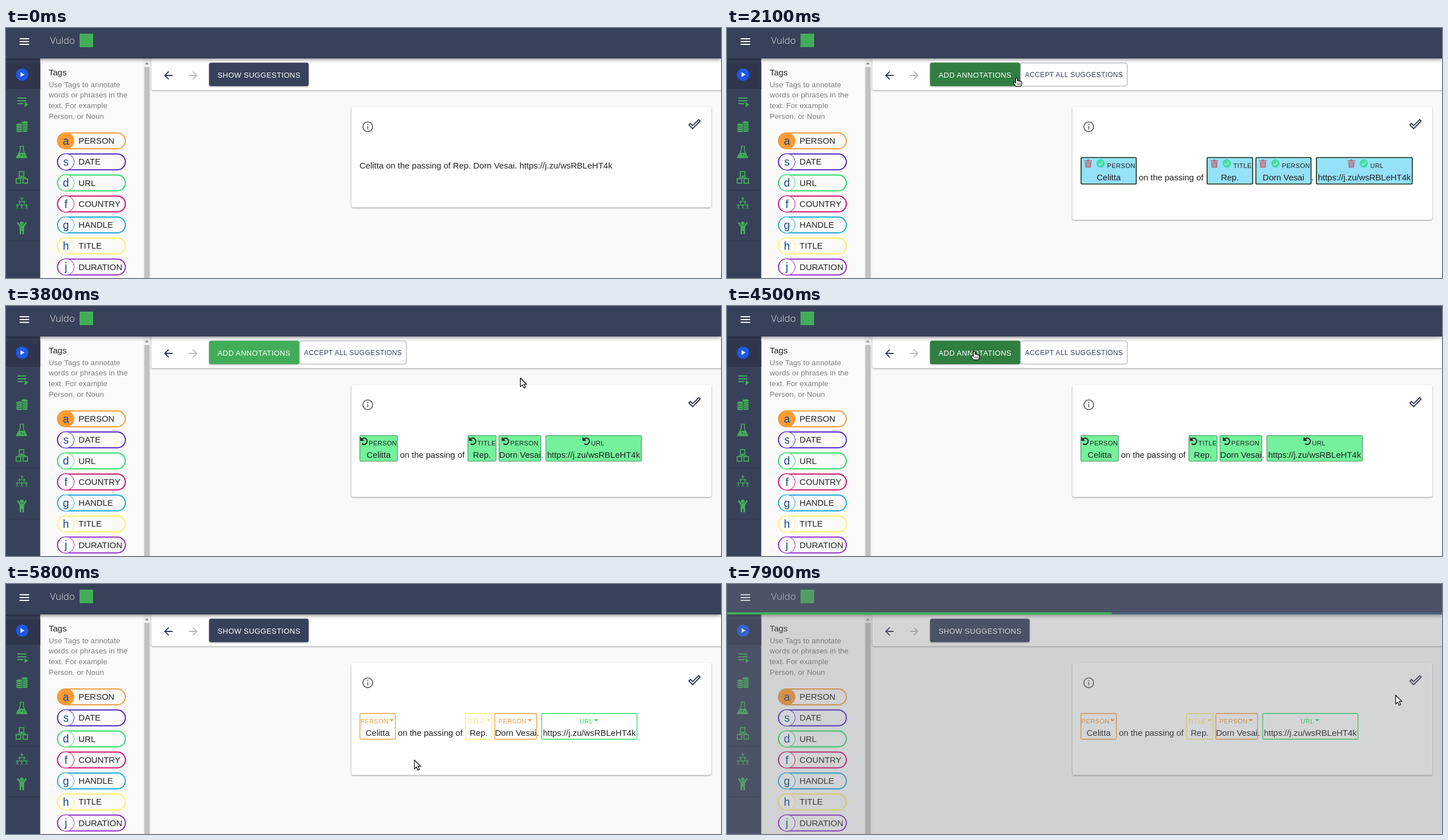
An HTML page that plays this animation: 1264x443 px, repeating every 8 s.

```html
<!DOCTYPE html>
<html lang="en">
<head>
<meta charset="utf-8">
<title>Text annotation</title>
<style>
html, body { margin: 0; width: 100%; height: 100%; overflow: hidden; background: #f9f9f9; }
svg { display: block; width: 1264px; height: 443px; font-family: "Liberation Sans", Arial, sans-serif; font-size: 15px; }
.low { filter: drop-shadow(0 1px 1px rgba(0,0,0,.42)); }
.raised { filter: drop-shadow(0 1.5px 1.5px rgba(0,0,0,.38)); }
.bar { filter: drop-shadow(0 2px 3px rgba(0,0,0,.45)); }
.btn { font-size: 13.125px; letter-spacing: .375px; }
.small { font-size: 12.1875px; letter-spacing: .348px; }
.hint { font-size: 13.125px; letter-spacing: .14px; fill: #7b7b7b; }
.label { font-size: 11.25px; letter-spacing: .375px; }
</style>
</head>
<body>
<svg id="stage" viewBox="0 0 1264 443"></svg>
<script>
const NAVY = '#38415a', GREEN = '#42ad59', INK = '#212121', ORANGE = '#f19c38';
const LOOP = 8000;
const FIRST = 'Celitta', FULL = 'Dorn Vesai', LINK = 'https://j.zu/wsRBLeHT4k';

const rect = (x, y, w, h, fill, r = 0, more = '') =>
  `<rect x="${x}" y="${y}" width="${w}" height="${h}" rx="${r}" fill="${fill}" ${more}/>`;
const circle = (x, y, r, fill, more = '') => `<circle cx="${x}" cy="${y}" r="${r}" fill="${fill}" ${more}/>`;
const path = (d, fill, more = '') => `<path d="${d}" fill="${fill}" ${more}/>`;
const line = (d, color, w = 2, more = '') => path(d, 'none', `stroke="${color}" stroke-width="${w}" ${more}`);
const text = (x, y, s, fill = INK, more = '') => `<text x="${x}" y="${y}" fill="${fill}" ${more}>${s}</text>`;
const mid = (x, y, s, fill = INK, more = '') => text(x, y, s, fill, `text-anchor="middle" ${more}`);
const group = (id, body, more = '') => `<g id="${id}" ${more}>${body}</g>`;
const at = (x, y, body, k = 1) => `<g transform="translate(${x} ${y}) scale(${k})">${body}</g>`;

// Top bar
function header() {
  return `<g class="bar">${rect(0, 0, 1264, 54, NAVY)}</g>` +
    line('M24 19H41M24 24H41M24 29H41', '#fff', 1.9) +
    text(78, 28, 'Vuldo', '#e8eaee', 'font-family="Open Sans, sans-serif" font-size="17" font-weight="300"') +
    rect(130, 10, 24, 24, GREEN);
}

// Left icon rail
function coins(x, y, n) {
  let s = '';
  for (let i = n - 1; i >= 0; i--) {
    s += `<ellipse cx="${x}" cy="${y + i * 3.6}" rx="6" ry="2.8" fill="${GREEN}" stroke="${NAVY}" stroke-width=".9"/>`;
  }
  return s;
}
function mini(x, y) {
  return circle(x, y, 1.5, GREEN) + line(`M${x - 3} ${y}L${x} ${y + 3}L${x + 3} ${y}M${x} ${y + 2}V${y + 4}L${x - 2} ${y + 7}M${x} ${y + 4}L${x + 2} ${y + 7}`, GREEN, 1);
}
function rail() {
  const box = (x, y) => rect(x, y, 8, 8, 'none', 0, `stroke="${GREEN}" stroke-width="1.8"`);
  return rect(0, 54, 60.5, 389, NAVY) + rect(0, 62, 60.5, 46, '#2f364b') +
    line('M0 287.5H60M0 377.5H60', '#2e364b', 1) +
    circle(28.5, 82.5, 10.8, '#1d58e8') + path('M25.7 78.2V86.8L32.6 82.5Z', '#fff') +
    line('M20 124H36M20 129H36M20 134H31', GREEN, 2.1) + path('M33 131.5V140L39.5 135.7Z', GREEN) +
    coins(33, 167.5, 5) + coins(23.5, 171.5, 4) +
    line('M24 209.5H32M25.3 210V217L18.5 229.5H36.5L30.7 217V210', GREEN, 1.6) +
    path('M22.5 221H33L37.5 230.5H18Z', GREEN) + circle(27, 225, 1.2, NAVY) + circle(31, 226.5, .9, NAVY) +
    box(23.5, 254.5) + box(18, 267) + box(30, 267) + line('M27.5 263V267M22 267V264.8H34V267', GREEN, 1.4) +
    mini(28, 301.5) + mini(24, 307.5) + mini(32, 307.5) + mini(20, 313.5) + mini(28, 313.5) + mini(36, 313.5) +
    circle(28, 346.3, 3.2, GREEN) +
    line('M21 345.5L25 351.5H31L35 345.5', GREEN, 3, 'stroke-linecap="round" stroke-linejoin="round"') +
    path('M24 350.5H32V365.5H29V359.5H27V365.5H24Z', GREEN);
}

// Tag list
function tagPanel() {
  const tags = [['a', 'PERSON', ORANGE], ['s', 'DATE', '#4c22c4'], ['d', 'URL', '#27dc5f'],
    ['f', 'COUNTRY', '#d00d6b'], ['g', 'HANDLE', '#19a9dc'], ['h', 'TITLE', '#fdef62'], ['j', 'DURATION', '#9426d0']];
  const hint = ['Use Tags to annotate', 'words or phrases in the', 'text. For example', 'Person, or Noun'];
  let s = rect(60.5, 54, 183, 389, '#fafafa') + rect(243, 54, 13.5, 389, '#f1f1f1') +
    rect(244.5, 69, 9.5, 380, '#c1c1c1') + path('M245.5 64.5H252.5L249 60.5Z', '#8f8f8f') +
    text(75.5, 84, 'Tags');
  hint.forEach((h, i) => { s += text(75.5, 104.6 + i * 18.7, h, '', 'class="hint"'); });
  tags.forEach(([key, name, color], i) => {
    const y = 200 + i * 37.25;
    s += rect(91, y - 14, 120, 28, 'none', 14, `stroke="${color}" stroke-width="2"`) +
      circle(106, y, 14.5, i ? '#fff' : '#ff9b33', `stroke="${color}" stroke-width="1"`) +
      mid(106, y + 6.8, key, '#184a8c', 'font-size="19.5"') +
      text(128.3, y + 5, name);
  });
  return s;
}

// Toolbar with its two button sets
function toolbar() {
  const arrow = 'M20 11H7.83l5.59-5.59L12 4l-8 8 8 8 1.41-1.41L7.83 13H20v-2z';
  const button = (w, fill, label, shade) => `<g class="raised">${rect(359, 61.5, w, 41.5, fill, 3.5)}</g>` +
    rect(359, 61.5, w, 41.5, '#000', 3.5, `id="${shade}" opacity="0"`) +
    text(374, 87.5, label, '#fff', 'class="btn"');
  return `<g class="low">${path('M257 54H1264V110.3H260.5Q257 110.3 257 107Z', '#fff')}</g>` +
    at(275.7, 72.7, path(arrow, '#2d364d'), .9375) +
    `<g transform="translate(342.3 72.7) scale(-.9375 .9375)">${path(arrow, '#b8b8b8')}</g>` +
    group('show', button(176, NAVY, 'SHOW SUGGESTIONS', 'showShade')) +
    group('review', button(159.5, GREEN, 'ADD ANNOTATIONS', 'addShade') +
      rect(518.9, 62, 188.7, 41, '#fff', 3.5, 'stroke="#9ba0ac"') +
      rect(518.9, 62, 188.7, 41, '#d9dadd', 3.5, `id="acceptShade" stroke="${NAVY}" opacity="0"`) +
      text(526.7, 87.2, 'ACCEPT ALL SUGGESTIONS', NAVY, 'class="small"'));
}

// Marked sentence: spans are [left, right, label x, label, word, colour]
function marked(spans, base, bottom, frame, extras) {
  const stop = spans[2][1];
  let s = text(spans[0][1] + 4.4, base, 'on the passing of') + text(stop + .3, base, '.');
  for (const [l, r, lx, label, word, color] of spans) {
    s += rect(l, 229.5, r - l, bottom - 229.5, frame.fill, 1.5, `stroke="${frame.stroke || color}" stroke-width="${frame.width}"`) +
      extras(lx, label) +
      text(lx, base - 22, label, frame.ink || color, 'class="label"') +
      mid((l + r) / 2, base, word);
  }
  return s;
}
function suggested() {
  const icons = x => at(x - 33.5, 240.5,
    line('M-6.5 -5H6.5M-2 -6.5H2', '#b4737f', 1.8) +
    path('M-5.5 -3H5.5L5 7H-5Z', '#b4737f') + line('M-2.2 -1V5M0 -1V5M2.2 -1V5', '#94e1f8', .8)) +
    circle(x - 11.5, 240, 7.4, '#42dda3') +
    line(`M${x - 15} 240L${x - 12.3} 242.7L${x - 7.7} 237.6`, '#b9f2f3', 1.5);
  return marked([
    [626, 723.5, 672, 'PERSON', FIRST], [848.7, 929.3, 895, 'TITLE', 'Rep.'],
    [935, 1032.5, 981, 'PERSON', FULL], [1042, 1211.5, 1137.3, 'URL', LINK]
  ], 270, 276.5, { fill: '#94e1f8', stroke: '#0f2a14', width: 1.6, ink: INK }, icons);
}
function accepted() {
  const undo = x => line(`M${x - 13} 236.5A5.6 5.6 0 1 1 ${x - 12} 244`, INK, 2) +
    path(`M${x - 15} 232V239H${x - 8}Z`, INK);
  return marked([
    [625.5, 692, 641.3, 'PERSON', FIRST], [816.5, 866.3, 833.3, 'TITLE', 'Rep.'],
    [871.5, 945.5, 891.5, 'PERSON', FULL], [954.3, 1123.3, 1034.2, 'URL', LINK]
  ], 269, 275, { fill: '#73f19b', stroke: '#3f8f57', width: 1, ink: INK }, undo);
}
function annotated() {
  const lime = '#27dc5f', sun = '#fbec6a';
  const spans = [
    [625.7, 688.4, 626.6, 'PERSON', FIRST, ORANGE], [812.5, 858.7, 814.3, 'TITLE', 'Rep.', sun],
    [864.3, 938, 870.6, 'PERSON', FULL, ORANGE], [947, 1115.5, 1014, 'URL', LINK, lime]];
  const caret = { 626.6: [681.6, ORANGE], 814.3: [852.8, sun], 870.6: [926, ORANGE], 1014: [1043.3, lime] };
  return marked(spans, 269, 275, { fill: 'none', width: 1.3 }, x => {
    const [c, color] = caret[x];
    return path(`M${c - 3.9} 239.6H${c + 3.9}L${c} 243.8Z`, color);
  });
}
function card() {
  const tick = 'M19.77 5.03l1.4 1.4L8.43 19.17l-5.6-5.6 1.4-1.4 4.2 4.2L19.77 5.03m0-2.83L8.43 13.54l-4.2-4.2L0 13.57 8.43 22 24 6.43 19.77 2.2z';
  return `<g class="low">${rect(610.5, 140, 636.5, 178, '#fff', 3.7, 'id="sheet"')}</g>` +
    circle(639.5, 175, 8.6, 'none', 'stroke="#666" stroke-width="1.8"') +
    line('M639.5 174V179.5M639.5 170.3V172.2', '#666', 1.9) +
    circle(1217.3, 170.5, 22.3, '#ebebeb', 'id="halo" opacity="0"') +
    at(1206, 159, path(tick, '#2d364d'), .9375) +
    group('plain', text(625, 248.6, `${FIRST} on the passing of Rep. ${FULL}. ${LINK}`)) +
    group('suggested', suggested()) + group('accepted', accepted()) + group('annotated', annotated()) +
    group('tip', rect(1190.5, 206, 53, 23, '#6d6d6d', 3.7) + mid(1217, 222, 'Submit', '#fff', 'font-size="12.2"'), 'opacity="0"');
}

function cursors() {
  const edge = 'stroke="#000" stroke-width="1.2" stroke-linejoin="round"';
  return group('arrow', path('M0 0V15.6L3.7 12.2L6.3 18L8.9 16.8L6.4 11.2H11.2Z', '#fff', edge)) +
    group('hand', path('M-1.6 1.2Q0 -.8 1.6 1.2V5.6Q3.3 4.6 4.3 6.1Q6 5.2 6.8 6.8Q9 6.2 9 8.6V11.5L7.6 15.4H-1.4L-5.2 10Q-5.6 7.4 -3.2 8.2L-1.6 9.6Z', '#fff', edge) +
      line('M1.2 9.5V12.8M3.6 9.5V12.8M6 9.5V12.8', '#000', .9));
}

const stage = document.getElementById('stage');
stage.innerHTML = rect(0, 0, 1264, 443, '#f9f9f9') + tagPanel() + toolbar() + card() + rail() + header() +
  group('veil', rect(0, 0, 1264, 443, 'rgb(116,119,126)', 0, 'fill-opacity=".31"')) +
  group('progress', rect(0, 50, 1264, 4, '#4a6482') + rect(0, 50, 0, 4, '#3fae58', 0, 'id="fill"')) + cursors();

const el = {};
stage.querySelectorAll('[id]').forEach(n => { el[n.id] = n; });

const clamp = v => Math.max(0, Math.min(1, v));
const smooth = v => v * v * (3 - 2 * v);
const pulse = (t, a, b, d = 180) => clamp((t - a) / d) * (1 - clamp((t - b) / d));
const set = (n, k, v) => el[n].setAttribute(k, v);
const show = (n, on) => set(n, 'display', on ? 'inline' : 'none');

// Pointer stops: time, x, y
const stops = [[300, 470, 158], [850, 452, 86], [1600, 452, 86], [2060, 512, 88], [2100, 512, 88],
  [2400, 608, 90], [3550, 608, 90], [4000, 1122, 154], [4450, 437, 80], [5250, 437, 80],
  [5500, 598, 264], [5620, 598, 264], [5800, 722, 312], [6300, 1100, 182], [6450, 1100, 182],
  [6900, 1211, 170], [7300, 1216.5, 174], [7600, 1216.5, 174], [7850, 1182, 197], [8000, 1182, 197]];

function pointer(t) {
  let i = 0;
  while (i < stops.length - 2 && t >= stops[i + 1][0]) i++;
  const [t0, x0, y0] = stops[i], [t1, x1, y1] = stops[i + 1];
  const k = smooth(clamp((t - t0) / (t1 - t0)));
  return [x0 + (x1 - x0) * k, y0 + (y1 - y0) * k];
}

function render(t) {
  const mode = t < 1400 ? 'plain' : t < 2800 ? 'suggested' : t < 4800 ? 'accepted' : 'annotated';
  const review = mode === 'suggested' || mode === 'accepted';
  for (const m of ['plain', 'suggested', 'accepted', 'annotated']) show(m, m === mode);
  set('sheet', 'height', mode === 'plain' ? 178 : mode === 'suggested' ? 200 : 198.5);
  show('show', !review);
  show('review', review);
  set('showShade', 'opacity', .3 * (pulse(t, 620, 1400) + pulse(t, 4620, 5300)));
  set('addShade', 'opacity', .27 * (pulse(t, 1220, 2150) + pulse(t, 4320, 4900)));
  set('acceptShade', 'opacity', pulse(t, 2200, 3600));
  set('halo', 'opacity', pulse(t, 6700, 7680));
  set('tip', 'opacity', pulse(t, 6850, 7600));

  set('veil', 'opacity', clamp((t - 7480) / 250));
  show('progress', t >= 7500);
  set('fill', 'width', 680 * clamp((t - 7450) / 450));

  const [x, y] = pointer(t);
  const hand = y > 61 && y < 103 && x > 359 && x < (review ? 708 : 535);
  show('arrow', t >= 300 && !hand);
  show('hand', t >= 300 && hand);
  set(hand ? 'hand' : 'arrow', 'transform', `translate(${x} ${y})`);
}

const start = performance.now();
function tick() {
  render((performance.now() - start) % LOOP);
  requestAnimationFrame(tick);
}
tick();
</script>
</body>
</html>
```
